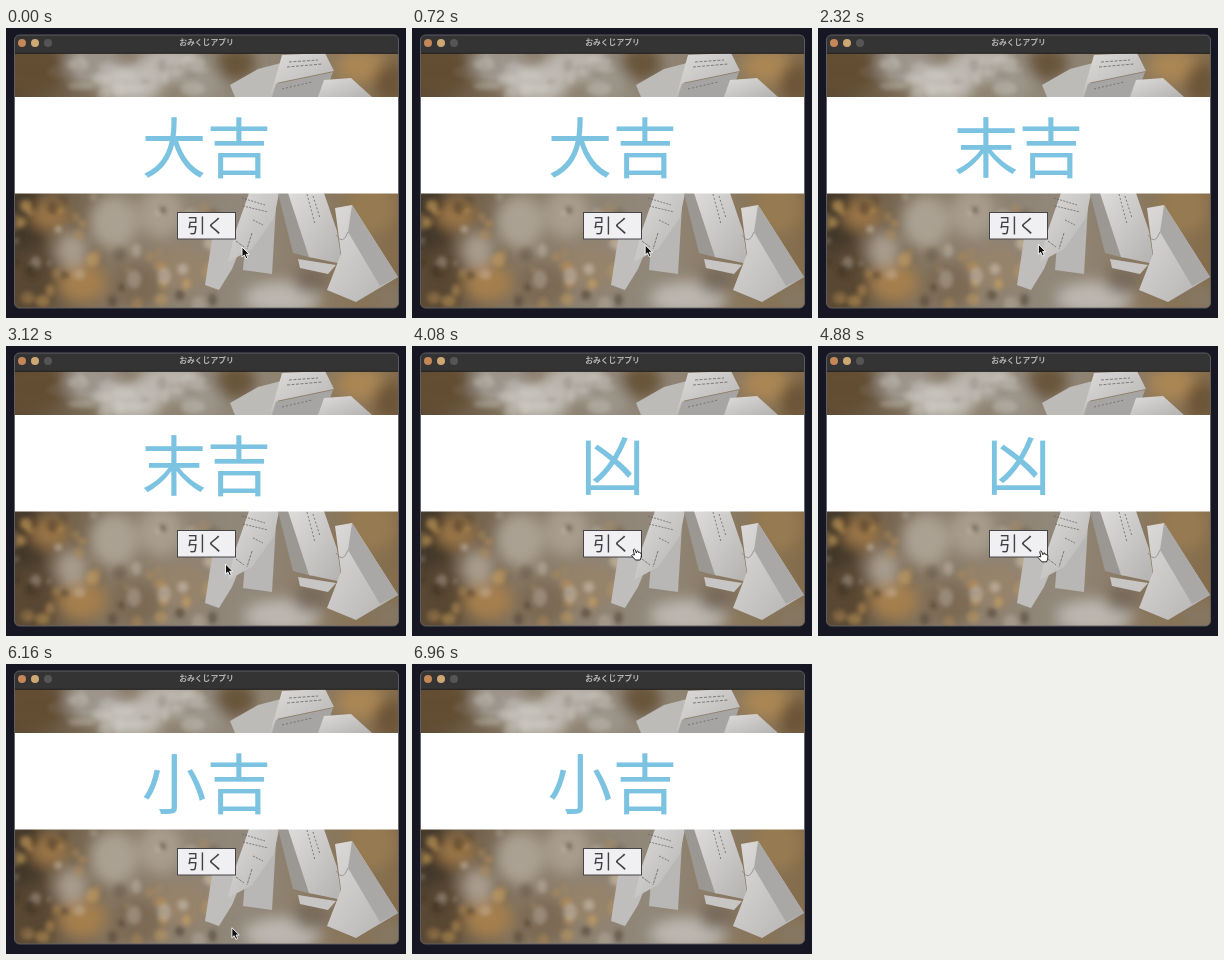
Recreate the animation shown at these times as an HTML page. Size 400 by 290 pixels, loop 7.04 s.

```html
<!DOCTYPE html>
<html lang="ja">
<head>
<meta charset="utf-8">
<title>おみくじアプリ</title>
<style>
html, body { margin: 0; width: 100%; height: 100%; overflow: hidden; background: #171723; }
svg { display: block; width: 400px; height: 290px; }
text { font-family: "Noto Sans CJK JP", "Noto Sans CJK", sans-serif; text-anchor: middle; }
#result { font-size: 65px; font-weight: 300; fill: #7cc3e1; }
#label { font-size: 19px; }
#title { font-size: 7.8px; font-weight: 700; fill: #b5b5b5; }
</style>
</head>
<body>
<svg viewBox="0 0 400 290">
  <defs>
    <clipPath id="win"><rect x="8.5" y="7" width="384" height="273" rx="5"/></clipPath>
    <filter id="soft" x="-50%" y="-50%" width="200%" height="200%"><feGaussianBlur stdDeviation="7"/></filter>
    <filter id="haze" x="-50%" y="-50%" width="200%" height="200%"><feGaussianBlur stdDeviation="2"/></filter>
    <filter id="edge"><feGaussianBlur stdDeviation=".5"/></filter>
    <linearGradient id="base">
      <stop offset="0" stop-color="#5b4933"/>
      <stop offset=".3" stop-color="#8b7d69"/>
      <stop offset=".6" stop-color="#91887b"/>
      <stop offset="1" stop-color="#846c4a"/>
    </linearGradient>
    <linearGradient id="paper" x2="1" y2="1">
      <stop offset="0" stop-color="#dddcda"/>
      <stop offset="1" stop-color="#b4b2b1"/>
    </linearGradient>
  </defs>

  <rect width="400" height="290" fill="#171723"/>
  <g clip-path="url(#win)">
    <rect x="8" y="25" width="385" height="256" fill="url(#base)"/>
    <g id="blobs" filter="url(#soft)"/>
    <g id="bokeh" filter="url(#haze)"/>

    <g filter="url(#edge)" fill="url(#paper)">
      <path d="M224 57L252 41L275 35L270 69H229Z" fill="#bdbbb8"/>
      <path d="M264 69L276 27L319 25L328 43L270 55Z"/>
      <path d="M270 56L327 44L318 69H266Z" fill="#a7a5a4"/>
      <path d="M318 52L345 50L366 69H312Z"/>
      <path d="M206 211L240 207L226 241L213 262L199 257Z" fill="#c0bebc"/>
      <path d="M240 205L270 178L266 246L237 242Z" fill="#b9b7b5"/>
      <path d="M243 165H273L268 190L246 221L222 234L229 205Z"/>
      <path d="M272 165H290L306 230L287 225Z" fill="#9b9894"/>
      <path d="M282 165H318L331 203L336 236L303 229Z"/>
      <path d="M329 180L346 177L392 249L350 274L321 262L335 226Z"/>
      <path d="M346 177L392 249L374 258L342 204Z" fill="#aaa8a6"/>
      <path d="M292 231L330 237L322 246L294 240Z" fill="#c8c6c4"/>
    </g>
    <g fill="none" stroke="#666" stroke-width=".8">
      <path d="M283 34L312 32M281 39L316 36" stroke-dasharray="3 1.5"/>
      <path d="M276 61L306 54" stroke-dasharray="2 2"/>
      <path d="M237 178L262 184M236 170L259 177M247 192L257 197" stroke-dasharray="2 1.2"/>
      <path d="M230 213L238 219M246 205L241 221" stroke-dasharray="3 1"/>
      <path d="M301 166L309 196M307 168L314 190" stroke-dasharray="2 2"/>
      <path d="M330 207Q337 218 342 204" stroke="#8a8886"/>
    </g>

    <rect x="8" y="69" width="385" height="96.5" fill="#fff"/>
    <rect x="8" y="7" width="385" height="18.5" fill="#343435"/>
    <path d="M8 25.3H393" stroke="#171717" stroke-width=".8"/>
    <circle cx="16" cy="15" r="4" fill="#c58757"/>
    <circle cx="29" cy="15" r="4" fill="#cda873"/>
    <circle cx="42" cy="15" r="4" fill="#555556"/>
    <text id="title" x="200.5" y="17.4">おみくじアプリ</text>
  </g>
  <rect x="8.5" y="7" width="384" height="273" rx="5" fill="none" stroke="#626267" stroke-width=".9"/>

  <text id="result" x="200.5" y="143.5">大吉</text>
  <rect id="button" x="171.5" y="184.5" width="58" height="26.5" stroke="#454448"/>
  <text id="label" x="200" y="204.7">引く</text>

  <g id="cursor">
    <path id="arrow" d="M0 0V10L2.3 8L4 11.7L5.8 10.9L4.2 7.3H7.3Z" fill="#111" stroke="#fff" stroke-width=".9"/>
    <path id="hand" d="M-.2 .8Q.9-.7 1.8 .8L2.9 4Q4-.1 5 3.4Q6.2 2.5 6.6 4.1Q7.9 3.6 8 5.2L7.6 8.3L6.7 11H2L-1.9 6.7Q-1.6 5 .9 6Z" fill="#fff" stroke="#111" stroke-width=".9"/>
  </g>
</svg>
<script>
const LOOP = 7040, STEP = 80;
const $ = id => document.getElementById(id);

function ellipse(parent, x, y, rx, ry, fill, opacity = 1) {
  const el = document.createElementNS("http://www.w3.org/2000/svg", "ellipse");
  const attrs = { cx: x, cy: y, rx, ry, fill, opacity };
  for (const key in attrs) el.setAttribute(key, attrs[key]);
  parent.append(el);
}

// Out-of-focus backdrop: x, y, rx, ry, colour
[
  [25, 42, 34, 24, "#644e32"], [88, 36, 28, 20, "#aaa59d"],
  [125, 55, 32, 20, "#c1bdb6"], [165, 35, 32, 17, "#bbb6af"],
  [196, 55, 20, 18, "#9c958a"], [230, 35, 20, 18, "#69543a"],
  [355, 38, 25, 17, "#aa8654"], [384, 55, 16, 20, "#6c5439"],
  [20, 195, 20, 40, "#43372a"], [44, 187, 20, 15, "#9a7546"],
  [28, 252, 22, 34, "#594630"], [76, 254, 24, 20, "#a57f4d"],
  [66, 222, 16, 18, "#a79c8e"], [108, 194, 24, 27, "#aba193"],
  [130, 258, 28, 24, "#7c6b55"], [155, 185, 22, 25, "#a99d8d"],
  [178, 240, 25, 22, "#97836b"], [276, 270, 38, 17, "#bbb6af"],
  [305, 252, 18, 14, "#786b5b"], [365, 180, 25, 26, "#967a51"],
  [382, 270, 20, 16, "#857762"]
].forEach(b => ellipse($("blobs"), ...b));

let seed = 17;
const rand = () => (seed = seed * 16807 % 2147483647) / 2147483647;
const glow = ["#d4a75f", "#b88e55", "#3c3022", "#d5cec2"];
for (let i = 0; i < 64; i++) {
  const x = 9 + rand() * 205, y = 168 + rand() * 110;
  const r = 2 + rand() * 6;
  ellipse($("bokeh"), x, y, r, r * (.8 + rand() * .6), glow[i % 4], .25 + rand() * .3);
}
for (let i = 0; i < 24; i++) {
  const x = 50 + rand() * 160, y = 26 + rand() * 42;
  ellipse($("bokeh"), x, y, 3 + rand() * 12, 2 + rand() * 6, i % 2 ? "#d8d4cd" : "#807568", .3);
}

const results = [[0, "大吉"], [1440, "末吉"], [3600, "凶"], [5680, "小吉"]];
const PRESS = 160;

// Pointer path: time, x, y
const path = [
  [0, 236, 219], [640, 234, 218], [1120, 223, 204], [1600, 222.5, 204],
  [2080, 220.5, 216], [3120, 219.5, 218], [3440, 222, 204],
  [4080, 221.5, 203], [5040, 222, 205], [5600, 220.5, 206.5],
  [5920, 222, 208], [6320, 228, 294], [LOOP, 228, 294]
];

function pointerAt(t) {
  const i = path.findIndex(p => p[0] > t);
  const [t0, x0, y0] = path[i - 1], [t1, x1, y1] = path[i];
  const k = (t - t0) / (t1 - t0), e = k * k * (3 - 2 * k);
  return [x0 + (x1 - x0) * e, y0 + (y1 - y0) * e];
}

function draw(now) {
  const t = Math.floor(now % LOOP / STEP) * STEP;
  $("result").textContent = results.filter(r => r[0] <= t).pop()[1];

  const pressed = results.some(([at]) => t >= at - PRESS && t < at);
  $("button").setAttribute("fill", pressed ? "#bcbbbdee" : "#f0eff2");
  $("label").setAttribute("fill", pressed ? "#111" : "#424145");

  const [x, y] = pointerAt(t), over = y < 212;
  $("cursor").setAttribute("transform", `translate(${x} ${y})`);
  $("hand").style.display = over ? "" : "none";
  $("arrow").style.display = over ? "none" : "";
}

const start = performance.now();
function tick() {
  draw(performance.now() - start);
  requestAnimationFrame(tick);
}
tick();
</script>
</body>
</html>
```
